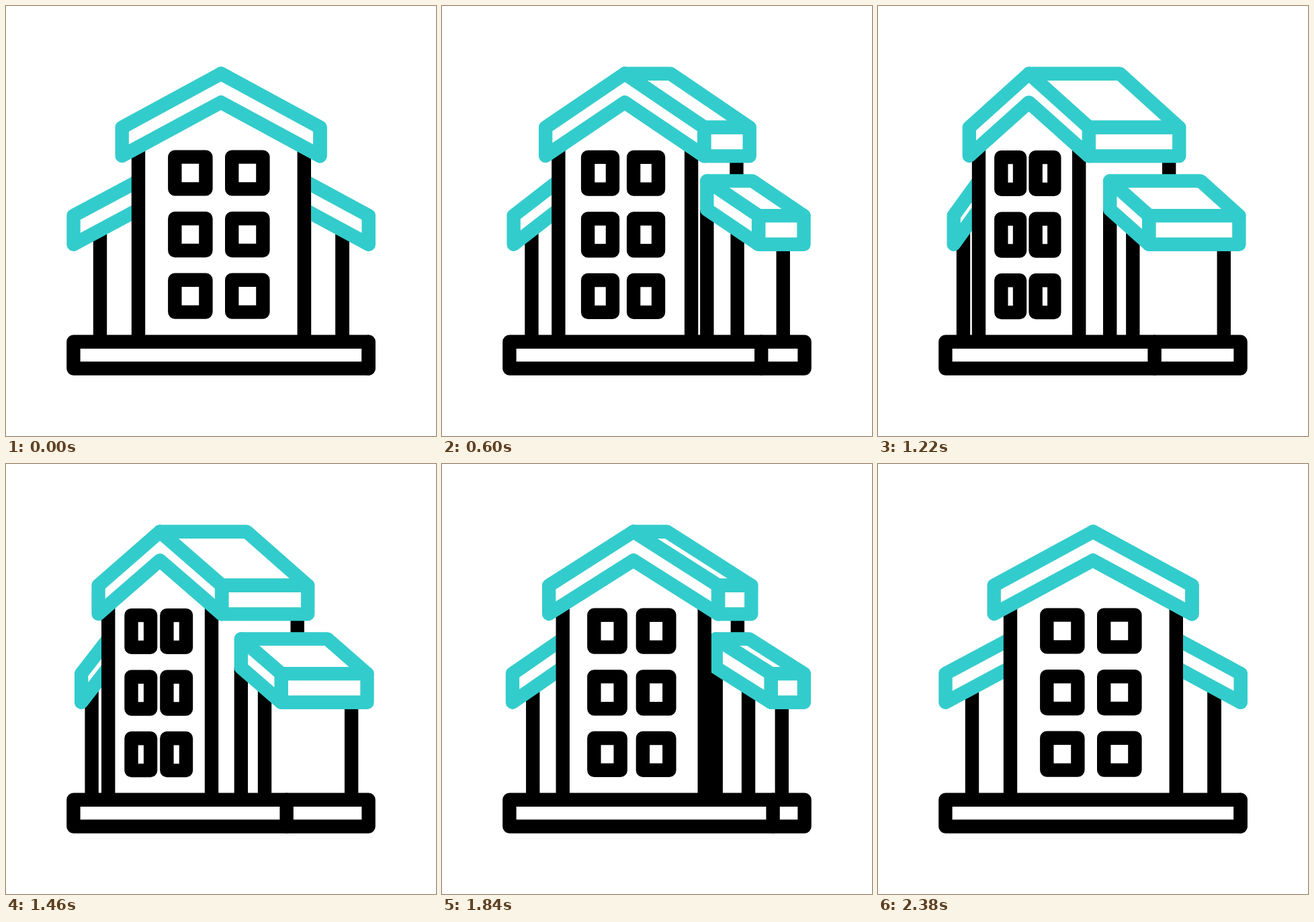
Animation, 640 px wide and 640 px high, one loop 2.4 s. Source, as an HTML page with a canvas:

```html
<!DOCTYPE html>
<html>
<head>
<meta charset="utf-8">
<title>Turning house</title>
<style>
html, body { margin: 0; height: 100%; overflow: hidden; background: #fff; }
canvas { display: block; width: 100vw; height: 100vh; }
</style>
</head>
<body>
<canvas id="stage" width="640" height="640"></canvas>
<script>
const ctx = document.getElementById('stage').getContext('2d');
const TEAL = '#33cccc', BLACK = '#000';
const LOOP = 2400, TURN = 1200, BACK = 1180;
const GROUND = 499.7;
let turn = 0; // 0 = front view, 1 = fully turned

// Symmetric cubic-bezier(.69, 0, .31, 1)
function ease(x) {
  const a = 0.69;
  let lo = 0, hi = 1;
  for (let i = 0; i < 30; i++) {
    const s = (lo + hi) / 2, r = 1 - s;
    if (3 * a * s * r * r + 3 * (1 - a) * s * s * r + s * s * s < x) lo = s; else hi = s;
  }
  return lo * lo * (3 - 2 * lo);
}

const mix = (front, turned) => front + (turned - front) * turn;

function trace(points, closed) {
  ctx.beginPath();
  points.forEach(([x, y]) => ctx.lineTo(x, y));
  if (closed) ctx.closePath();
}

function shape(color, ...points) {
  trace(points, true);
  ctx.fill();
  ctx.strokeStyle = color;
  ctx.stroke();
}

function wall(x, top, bottom = GROUND, cap = 'butt') {
  trace([[x, top], [x, bottom]]);
  ctx.lineCap = cap;
  ctx.strokeStyle = BLACK;
  ctx.stroke();
}

// Sloping roof plane seen from the side, with its front band and end face
function roofSide(apex, backApex, eave, backEave, y, drop, depth) {
  const low = y + drop;
  shape(TEAL, [apex, y], [backApex, y], [backEave, low], [eave, low]);
  shape(TEAL, [eave, low], [backEave, low], [backEave, low + depth], [eave, low + depth]);
  shape(TEAL, [apex, y], [eave, low], [eave, low + depth], [apex, y + depth]);
}

function drawLeftWing(houseLeft) {
  const eave = mix(100.5, 112.7);
  wall(mix(140, 127), 334);
  shape(TEAL, [eave, 312], [houseLeft, 260.4], [houseLeft, 303], [eave, 354.7]);
}

function drawRightWing() {
  const apex = mix(444, 345.2);
  wall(apex, 303);
  wall(mix(500.6, 379.3), 333);
  wall(mix(500.6, 514.8), 340);
  roofSide(apex, mix(444, 480), mix(539.7, 403.2), mix(539.7, 537.4), 260.4, 51.7, 42.6);
}

function drawHouse(left, right) {
  const apex = mix(320, 224.6), eave = mix(467.3, 313.8), leftEave = mix(172.7, 135.8);
  trace([[left, 212], [apex, 143.4], [right, 212], [right, GROUND], [left, GROUND]], true);
  ctx.fill();
  wall(left, 211);
  wall(right, 211);
  for (let row = 0; row < 3; row++) {
    const top = 224.6 + 91.6 * row + turn * 0.5, bottom = top + 47.8;
    for (const [a, b] of [[mix(251.3, 183.3), mix(297.4, 211)], [mix(336.2, 234.6), mix(382.4, 262.3)]])
      shape(BLACK, [a, top], [b, top], [b, bottom], [a, bottom]);
  }
  roofSide(apex, mix(320, 360), eave, mix(467.3, 448.3), 100.7, 80.1, 42.6);
  shape(TEAL, [apex, 100.7], [eave, 180.8], [eave, 223], [apex, 143.4], [leftEave, 223], [leftEave, 180.8]);
}

function drawBase() {
  shape(BLACK, [100.4, GROUND], [539.6, GROUND], [539.6, 539.5], [100.4, 539.5]);
  wall(mix(539.6, 411.6), GROUND, 539.5, 'round');
}

function draw(now) {
  const t = now % LOOP;
  turn = t < TURN ? ease(t / TURN) : 1 - ease(Math.min(1, (t - TURN) / BACK));
  const left = mix(197, 150), right = mix(443.8, 299.2);
  ctx.clearRect(0, 0, 640, 640);
  ctx.fillStyle = '#fff';
  ctx.lineWidth = 20.4;
  ctx.lineJoin = 'round';
  wall(mix(443.8, 433.2), 211, 260, 'round');
  drawLeftWing(left);
  drawRightWing();
  drawHouse(left, right);
  drawBase();
  requestAnimationFrame(draw);
}
requestAnimationFrame(draw);
</script>
</body>
</html>
```
